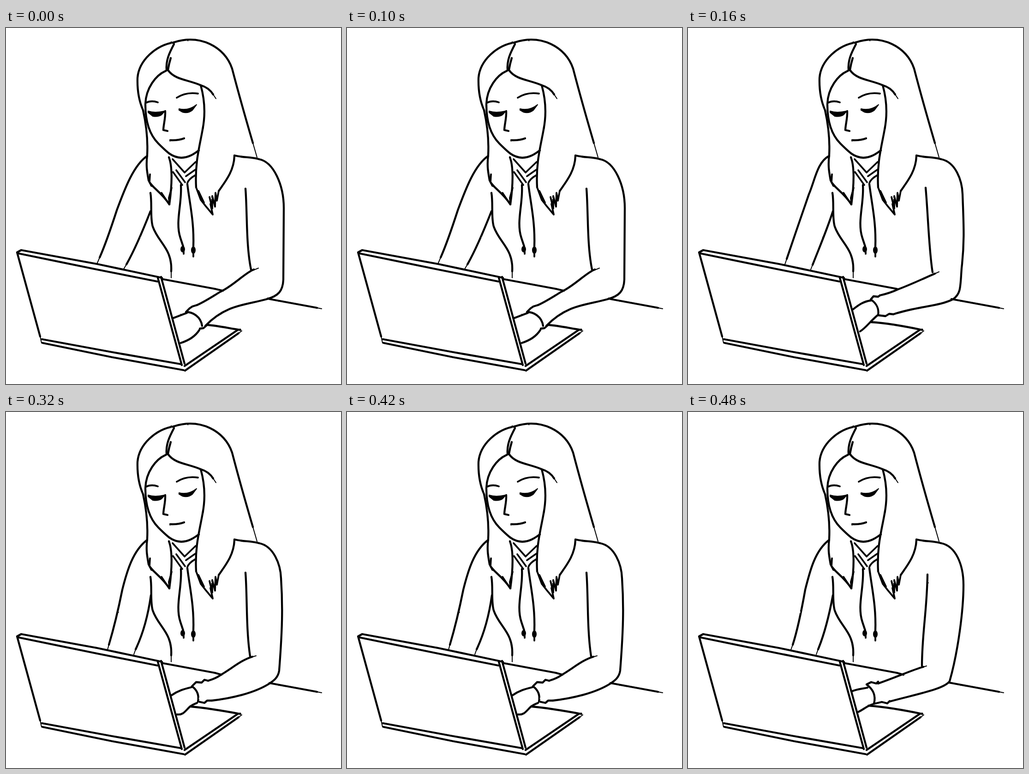
Write an HTML page without scripts that moves like this. It is 726x771 px and loops after 0.64 s.

```html
<!DOCTYPE html>
<html lang="en">
<head>
<meta charset="utf-8">
<title>Typing at a laptop</title>
<style>
  html, body { margin: 0; width: 100%; height: 100%; overflow: hidden; background: #fff; }
  svg { display: block; width: 100%; height: 100%; }
  .ink { fill: none; stroke: #000; stroke-width: 4.3; stroke-linecap: round; stroke-linejoin: round; }
  .mid { stroke-width: 3.8; }
  .thin { stroke-width: 2; }
  .solid { fill: #000; stroke-width: 2; }
  .pose { visibility: hidden; animation: show 640ms step-end infinite; }
  .b { animation-delay: -480ms; }
  .c { animation-delay: -320ms; }
  .d { animation-delay: -160ms; }
  @keyframes show {
    0% { visibility: visible; }
    25%, 100% { visibility: hidden; }
  }
</style>
</head>
<body>
<svg viewBox="0 0 726 771">
  <defs>
    <filter id="rough" filterUnits="userSpaceOnUse" x="0" y="0" width="726" height="771" color-interpolation-filters="sRGB">
      <feTurbulence type="fractalNoise" baseFrequency=".08" numOctaves="2" seed="4"/>
      <feDisplacementMap in="SourceGraphic" scale="1.4" xChannelSelector="R" yChannelSelector="G"/>
    </filter>
  </defs>
  <g class="ink" filter="url(#rough)">

    <!-- hair -->
    <path d="M364 31C325 37 288 70 285 108C284 140 289 160 297 178C303 205 308 235 306 275C303 300 306 312 309 330C315 345 336 354 354 382"/>
    <path d="M364 31C420 13 474 40 490 88C501 130 520 198 535 249"/>
    <path class="thin" d="M535 249L544 280"/>
    <path d="M364 35C354 54 346 70 348 92M357 65Q353 78 351 91"/>
    <path d="M351 91C365 112 395 112 422 124C436 128 444 136 449 144"/>
    <path class="thin" d="M449 144L455 153"/>
    <path d="M422 124C432 160 432 190 426 220C420 255 409 290 412 345"/>
    <path d="M353 280C361 300 360 340 354 382"/>
    <path class="mid" d="M312 317L311 334L315 342M359 346L353 368L354 379M337 357L347 372"/>
    <path class="mid" d="M412 345L422 372L433 386L448 404L443 381M417 353L429 378M441 366L447 391L447 364L453 387L454 357L457 374L461 353"/>
    <path d="M461 353C478 329 494 308 495 277"/>

    <!-- face -->
    <path d="M346 93C325 102 303 130 302 165C302 200 310 230 330 250C350 270 360 280 380 281C400 280 410 270 418 265"/>
    <path class="mid" d="M303 162Q315 156 329 161M370 151Q390 138 416 142"/>
    <path class="solid" d="M308 180Q322 185 344 180L337 188Q330 193 318 191L308 183ZM375 175Q395 180 413 166L404 178Q394 186 382 182L375 178Z"/>
    <path d="M345 180C346 195 341 210 341 221L350 223M356 243Q372 244 386 239"/>

    <!-- collar and cords -->
    <path class="mid" d="M361 284L387 313L411 290M369 308L388 334M362 312L382 340M390 321L410 307M393 336Q396 327 410 319"/>
    <path d="M379 340C382 380 366 420 378 455L384 473M393 338C398 380 408 420 406 474"/>
    <ellipse class="solid" cx="383" cy="479" rx="4" ry="6"/>
    <ellipse class="solid" cx="406" cy="481" rx="4" ry="7"/>
    <path class="mid" d="M385 484V489M406 487V495"/>

    <!-- body -->
    <path d="M313 357C317 380 312 410 318 430C330 465 361 478 358 527"/>
    <path class="thin" d="M358 527V541"/>
    <path d="M495 276C515 281 530 279 548 284"/>

    <!-- desk and laptop -->
    <path d="M340 544L453 565M571 587L674 606"/>
    <path class="thin" d="M674 606L684 608"/>
    <path d="M74 668L24 486L33 481L197 511L338 541M26 488L197 523L328 549"/>
    <path d="M329 541L381 730M336 539L387 727"/>
    <path d="M78 674L230 702L379 728M79 682L230 713L385 741M387 732L502 654M388 742L504 661"/>
    <path class="thin" d="M74 668L77 682M502 654L508 652M504 661L511 656"/>

    <g class="pose a">
      <path d="M306 277C275 298 255 355 240 395C227 435 214 472 203 497M313 397C300 430 282 475 261 512"/>
      <path class="thin" d="M203 497L197 511M261 512L255 522M535 525L547 520"/>
      <path d="M548 284C580 290 602 340 602 390L601 545C600 570 590 580 566 587C520 600 478 598 432 645"/>
      <path d="M519 348C523 400 520 470 531 523M537 523C520 529 490 560 465 571C445 583 430 593 414 600"/>
      <path d="M414 600L404 603L398 607L390 615C405 615 422 625 425 645M420 651L428 650L436 643"/>
      <path d="M363 628L392 617M379 682C395 677 410 668 419 654M437 643C460 645 482 650 508 654M453 565L470 569M567 586H571"/>
    </g>

    <g class="pose b">
      <path d="M306 277C280 290 275 330 262 360C245 410 230 452 214 500M314 397C300 440 286 472 270 513"/>
      <path class="thin" d="M214 500L210 512M270 513L266 523M533 533L544 528"/>
      <path d="M548 284C580 290 594 330 595 360C597 420 600 460 593 520C590 560 592 575 575 587C545 603 500 602 445 620"/>
      <path d="M515 346C520 400 522 480 530 529M535 532C520 538 485 555 455 566C440 573 430 576 416 579"/>
      <path d="M416 579L412 582L402 581L396 588C410 597 414 610 412 622L428 624L436 619L445 620"/>
      <path d="M358 609C370 600 380 592 397 590M373 657C385 650 395 635 411 622M397 637C430 639 470 646 508 654"/>
    </g>

    <g class="pose c">
      <path d="M306 277C275 300 262 345 252 385C243 430 234 467 223 504M314 397C308 440 297 480 281 514"/>
      <path class="thin" d="M223 504L220 515M281 514L277 525M531 531L542 528"/>
      <path d="M548 284C580 290 595 330 596 360C600 420 599 470 592 560C590 575 580 582 571 588C540 608 490 620 446 625"/>
      <path d="M519 348C523 400 520 470 529 529M534 530C510 537 490 555 466 569C455 577 445 580 438 582"/>
      <path d="M438 582L430 580L424 586L412 585L403 594C414 602 419 612 416 627L430 630L436 625L446 625"/>
      <path d="M358 614C375 602 390 599 402 596M371 655C385 657 390 645 400 637C408 632 410 632 414 630M401 638C435 641 470 647 508 654M453 565L467 569"/>
    </g>

    <g class="pose d">
      <path d="M306 277C275 300 264 345 254 385C246 430 238 470 227 504M314 397C306 440 296 480 282 514"/>
      <path class="thin" d="M227 504L223 515M282 514L278 525M507 553L517 550"/>
      <path d="M548 284C580 290 597 330 597 375C597 430 585 520 567 583C555 600 500 610 437 627"/>
      <path d="M519 352C518 430 507 480 507 550M510 552C490 557 450 575 412 588"/>
      <path d="M412 584L408 588L397 585L387 590C400 600 408 612 403 632L420 628L432 631L437 626"/>
      <path d="M355 605C367 600 375 600 389 597M368 650C380 645 385 638 400 633M391 636C430 639 470 646 508 654M453 565L467 569M565 586L571 587"/>
    </g>
  </g>
</svg>
</body>
</html>
```
